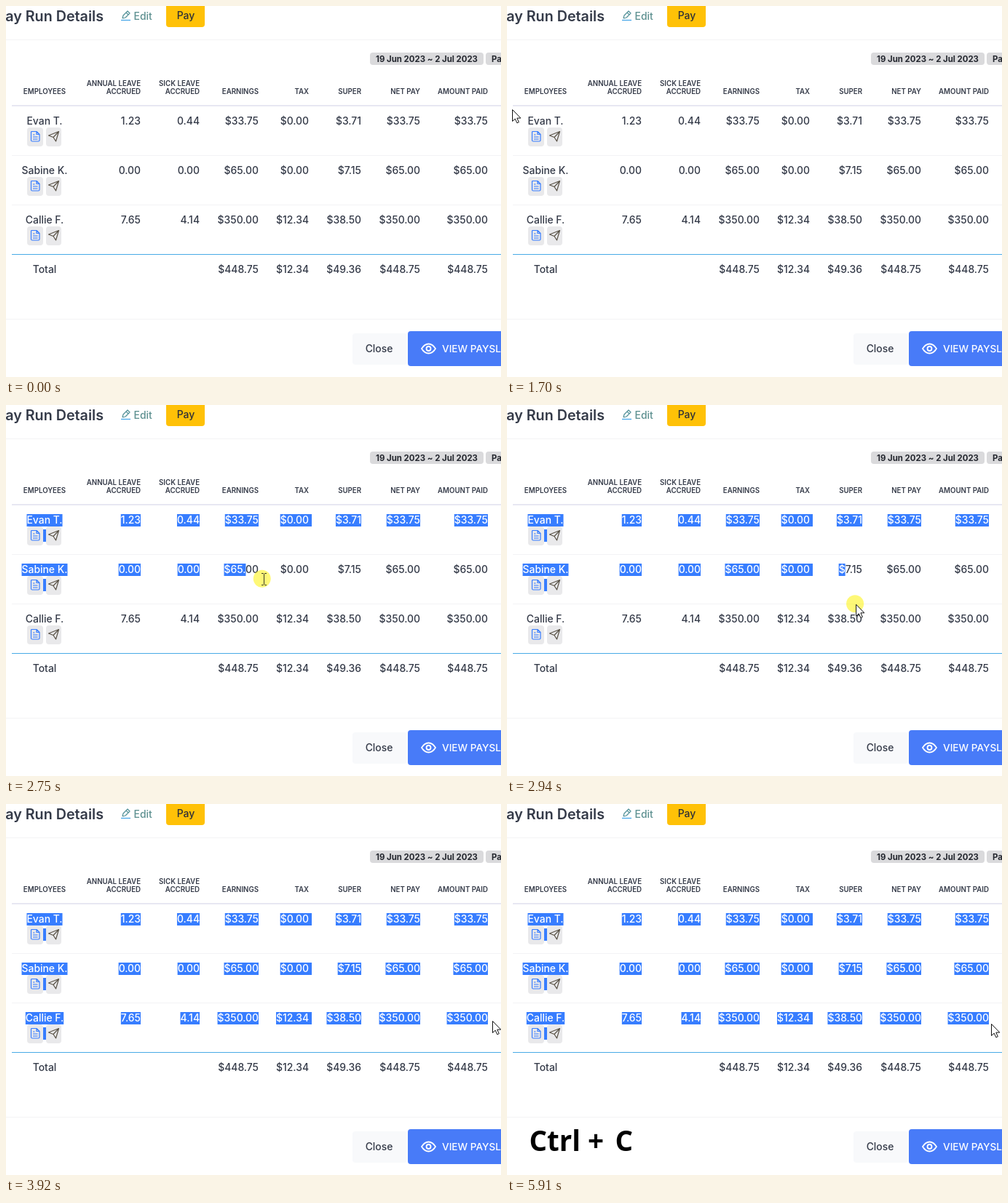
Write an HTML page with a canvas that moves like this. It is 680 px wide and 510 px high and loops after 5940 ms.

```html
<!DOCTYPE html>
<html lang="en">
<head>
<meta charset="utf-8">
<title>Pay run selection</title>
<style>
html, body { margin: 0; height: 100%; overflow: hidden; background: #fff; }
canvas { display: block; }
</style>
</head>
<body>
<canvas id="stage" width="680" height="510"></canvas>
<script>
const ctx = document.getElementById('stage').getContext('2d');
const LOOP = 5940;
const INK = '#343a48', BLUE = '#377dff';
const BODY = '450 13.9px Inter, sans-serif';
const HEAD = '600 9.7px Inter, sans-serif';
const RIGHTS = [185, 266, 347, 416, 488, 569, 662];
const HEADERS = ['ANNUAL LEAVE|ACCRUED', 'SICK LEAVE|ACCRUED', 'EARNINGS', 'TAX', 'SUPER', 'NET PAY', 'AMOUNT PAID'];
const ROWS = [
  'Evan T.|1.23|0.44|$33.75|$0.00|$3.71|$33.75|$33.75',
  'Sabine K.|0.00|0.00|$65.00|$0.00|$7.15|$65.00|$65.00',
  'Callie F.|7.65|4.14|$350.00|$12.34|$38.50|$350.00|$350.00',
  'Total|||$448.75|$12.34|$49.36|$448.75|$448.75'
].map(row => row.split('|'));

// Pointer path: time, x, y
const PATH = [
  [1160, 260, 498], [1700, 7, 142], [1960, 7, 142], [1990, 7, 143],
  [2220, 7, 143], [2300, 18, 150], [2360, 55, 164], [2560, 203, 204],
  [2750, 352, 239], [2810, 395, 257], [2850, 422, 264], [3140, 604, 295],
  [3300, 644, 303], [3420, 665, 299], [3460, 666, 298], [3490, 668, 298],
  [5909, 668, 298], [5910, 665, 302], [LOOP, 665, 302]
];

function pointerAt(t) {
  const i = Math.max(1, PATH.findIndex(p => p[0] >= t));
  const [t0, x0, y0] = PATH[i - 1], [t1, x1, y1] = PATH[i];
  let p = Math.max(0, (t - t0) / (t1 - t0));
  if (i === 1) p = 1 - (1 - p) ** 2;
  return [x0 + (x1 - x0) * p, y0 + (y1 - y0) * p];
}

function text(str, x, y, font = BODY, color = INK, align = 'left') {
  ctx.font = font;
  ctx.fillStyle = color;
  ctx.textAlign = align;
  ctx.fillText(str, x, y);
}

function box(x, y, w, h, color, r = 0) {
  ctx.fillStyle = color;
  ctx.beginPath();
  ctx.roundRect(x, y, w, h, r);
  ctx.fill();
}

function shape(x, y, d, stroke, width, fill) {
  const path = new Path2D(d);
  ctx.save();
  ctx.translate(x, y);
  ctx.lineWidth = width;
  ctx.lineJoin = 'round';
  if (fill) { ctx.fillStyle = fill; ctx.fill(path); }
  ctx.strokeStyle = stroke;
  ctx.stroke(path);
  ctx.restore();
}

function drawChrome() {
  box(0, 0, 680, 510, '#fff');
  text('Pay Run Details', 134, 21, '600 19.7px Inter, sans-serif', INK, 'right');
  shape(158, 6, 'M2 11L3 7L9 1L12 4L6 10L2 11M7 3L10 6', '#4f8f96', 1.2);
  shape(158, 6, 'M0 13.5H13', '#47a6e8', 1.3);
  text('Edit', 175.5, 19, BODY, '#5d9090');
  box(220, -6, 53, 35, '#ffc107', 4);
  text('Pay', 247, 18, BODY, '#2c2f38', 'center');
  box(0, 46, 680, 1, '#f3f3f5');

  const pill = '700 11.4px Inter, sans-serif';
  box(500, 64, 156, 17, '#dadadc', 4);
  text('19 Jun 2023 ~ 2 Jul 2023', 578, 77, pill, '#24272f', 'center');
  box(659, 64, 50, 17, '#dadadc', 4);
  text('Paid', 667, 77, pill, '#24272f');

  text('EMPLOYEES', 53, 121, HEAD, INK, 'center');
  HEADERS.forEach((label, i) => label.split('|').reverse().forEach((line, n) =>
    text(line, RIGHTS[i], 121 - 11 * n, HEAD, INK, 'right')));

  box(8, 136, 672, 2, '#e7e7f2');
  box(8, 205, 672, 1, '#f3f3f5');
  box(8, 273, 672, 1, '#f3f3f5');
  box(8, 341, 672, 1, '#48abe6');
  box(0, 430, 680, 1, '#f3f3f5');

  box(476, 450, 75, 43, '#f8f9fb', 4);
  text('Close', 512.5, 476, BODY, INK, 'center');
  box(552, 447, 140, 48, '#487bf8', 4);
  shape(580.5, 471, 'M-9.5 0Q-5.5 -6.5 0 -6.5T9.5 0Q5.5 6.5 0 6.5T-9.5 0ZM3 0A3 3 0 1 1 -3 0A3 3 0 1 1 3 0Z', '#fff', 1.8);
  text('VIEW PAYSLIPS', 599, 476, '500 13.6px Inter, sans-serif', '#fff');
}

function drawIcons(y) {
  box(29, y, 22, 26, '#e9e9eb', 4);
  box(55, y, 21, 26, '#e9e9eb', 4);
  shape(34.5, y + 5.5, 'M1 0H7.5L11.5 4V12Q11.5 13.5 10 13.5H1.5Q0 13.5 0 12V1Q0 0 1 0ZM7.5 0V4H11.5M2.5 4.5H5M2.5 7.5H9M2.5 10.5H9', BLUE, 1.2);
  shape(58, y + 5, 'M0.5 6L14.5 0.5L10.5 14L7 8.5ZM7 8.5L14.5 0.5', '#5a5347', 1.2);
}

// Width of str up to the caret nearest to offset
function caretWidth(str, offset) {
  let best = 0;
  for (let n = 1; n <= str.length; n++) {
    const w = ctx.measureText(str.slice(0, n)).width;
    if (Math.abs(w - offset) < Math.abs(best - offset)) best = w;
  }
  return best;
}

function drawCell(str, col, baseline, reach) {
  ctx.font = BODY;
  const width = ctx.measureText(str).width;
  const x = col ? RIGHTS[col - 1] - width : 53 - width / 2;
  text(str, x, baseline);
  let selected = caretWidth(str, reach - x);
  if (!str || selected <= 0) return;
  if (col === 4 && selected >= width) selected += 4;
  box(x, baseline - 13, selected, 17, BLUE);
  ctx.save();
  ctx.beginPath();
  ctx.rect(x, baseline - 13, selected, 17);
  ctx.clip();
  text(str, x, baseline, BODY, '#fff');
  ctx.restore();
}

function drawTable(t) {
  const [sx, sy] = pointerAt(t - 26);
  const active = t > 2310;
  ROWS.forEach((cells, r) => {
    const top = 137 + 68 * r;
    let reach = -1;
    if (active && sy >= top) reach = sy >= top + 68 ? 999 : sx;
    cells.forEach((str, c) => drawCell(str, c, top + 26, reach));
    if (r === 3) return;
    drawIcons(top + 30);
    if (reach > 100) box(51, top + 34, 4, 17, BLUE);
  });
}

function drawPointer(t) {
  if (t < 1160) return;
  const [x, y] = pointerAt(t);
  if (t >= 2250 && t < 3920) {
    ctx.fillStyle = 'rgba(254,243,20,.58)';
    ctx.beginPath();
    ctx.arc(x - 1, y - 0.5, 12, 0, 7);
    ctx.fill();
  }
  if (t >= 2250 && t < 2820) {
    shape(Math.round(x) + 1.5, Math.round(y), 'M-3.5 -7.5H-1L0 -6.5L1 -7.5H3.5M0 -6.5V7.5M-3.5 8.5H-1L0 7.5L1 8.5H3.5', '#3b3a24', 1);
  } else {
    shape(x + 0.5, y + 0.5, 'M0 0V16L3.7 12.6L6.3 18.3L8.8 17.2L6.3 11.6H11.3Z', '#111', 1, '#fff');
  }
}

function drawKeys(t) {
  const font = '700 38.5px "Open Sans", sans-serif';
  if (t >= 4580) text('Ctrl +', 30.5, 476.5, font, '#000');
  if (t >= 4950) text('C', 148.5, 476.5, font, '#000');
}

function frame(now) {
  const t = now % LOOP;
  drawChrome();
  drawTable(t);
  drawPointer(t);
  drawKeys(t);
  requestAnimationFrame(frame);
}
requestAnimationFrame(frame);
</script>
</body>
</html>
```
